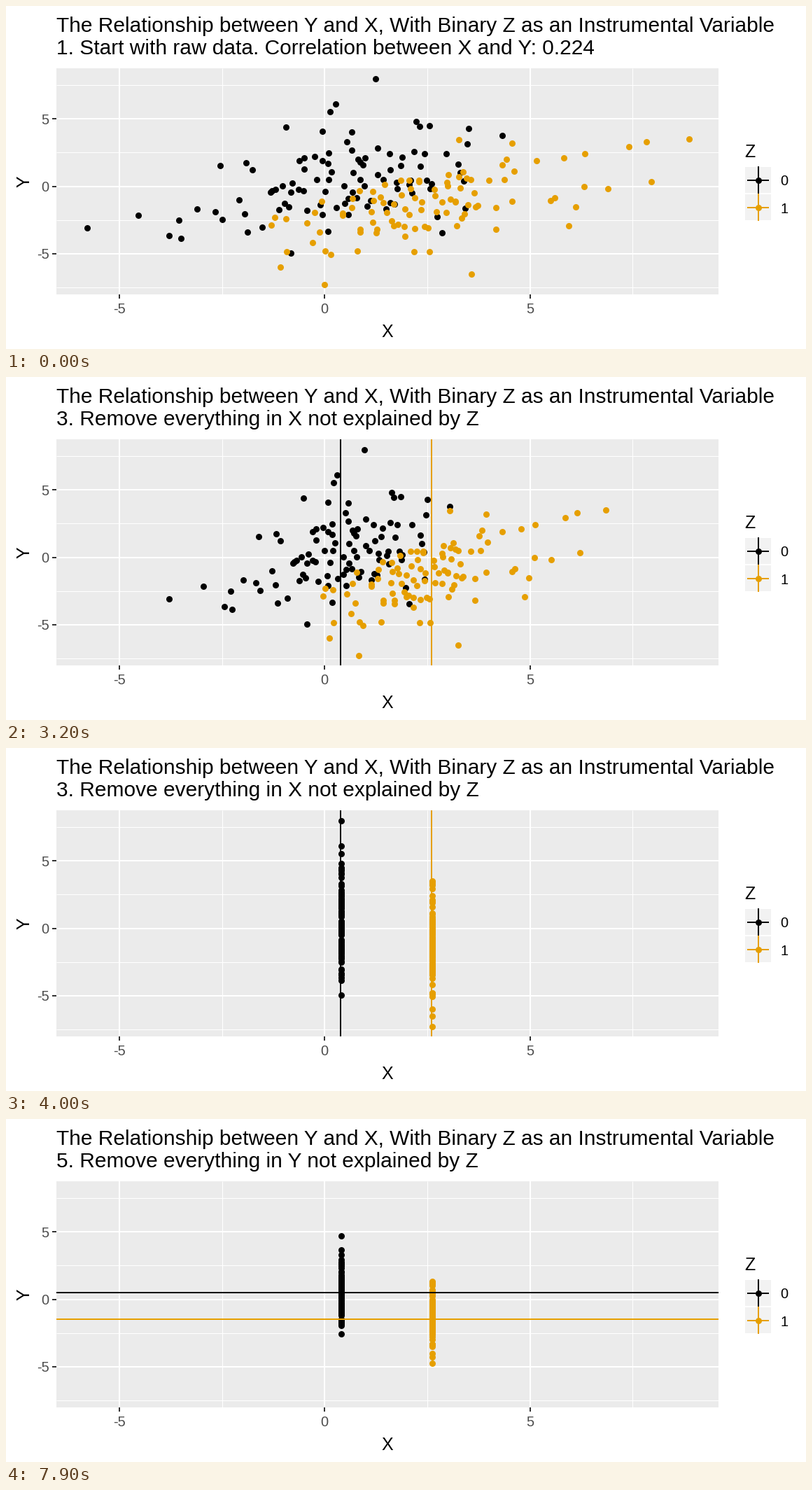
Recreate the animation shown at these times as a matplotlib script. Size 1143 px wide and 490 px high, loop 8000 ms.

```python
import numpy as np
import matplotlib.pyplot as plt
from matplotlib.animation import FuncAnimation
from matplotlib.patches import Rectangle

W, H, DPI = 1143, 490, 64
PT = 72 / DPI                      # points per pixel
STEP, FRAMES = 100, 80             # ms per frame, frames per loop
SLIDE = 1300                       # ms a collapse takes
LEFT, TOP, RIGHT, BOTTOM = 72, 89, 1018, 412
BLACK, ORANGE = "#000000", "#E69F00"
COLORS = (BLACK, ORANGE)
MEANS = ((478, 248), (608, 286))   # group means on the stage

TITLE = "The Relationship between Y and X, With Binary Z as an Instrumental Variable"
STAGES = (
    (0, "1. Start with raw data. Correlation between X and Y: 0.224"),
    (500, "2. Figure out what differences in X are explained by Z"),
    (2800, "3. Remove everything in X not explained by Z"),
    (5100, "4. Figure out what differences in Y are explained by Z"),
    (7400, "5. Remove everything in Y not explained by Z"),
)

# Outlying observations in stage pixels; the cores are generated
OUTER_0 = [
    (115, 316), (188, 298), (232, 327), (249, 331), (246, 305), (272, 289),
    (298, 293), (308, 304), (305, 227), (342, 223), (351, 233), (332, 276),
    (340, 296), (344, 322), (365, 315), (406, 352), (459, 321), (399, 172),
    (451, 178), (470, 139), (462, 150), (527, 103), (493, 179), (585, 164),
    (590, 171), (604, 170), (660, 174), (708, 184), (658, 196), (645, 225),
    (628, 210), (622, 323), (615, 300), (655, 288), (648, 237), (653, 249),
]
OUTER_1 = [
    (975, 189), (914, 193), (889, 200), (826, 210), (796, 216), (757, 220),
    (921, 250), (859, 260), (825, 257), (813, 286), (803, 313), (783, 273),
    (777, 277), (722, 195), (714, 218), (708, 226), (725, 235), (711, 247),
    (722, 278), (699, 318), (699, 287), (646, 190), (664, 382), (604, 350),
    (582, 350), (501, 349), (463, 354), (455, 349), (454, 397), (391, 372),
    (400, 350), (437, 337), (447, 322), (378, 312), (399, 303), (383, 301),
    (429, 309), (440, 294), (450, 278),
]

rng = np.random.default_rng(224)


def core(n, cx, cy, rx, ry, tilt):
    """Evenly filled, jittered ellipse of n points."""
    k = np.arange(n)
    r = np.sqrt((k + 0.5) / n) * rng.uniform(0.9, 1.08, n)
    a = k * np.pi * (3 - np.sqrt(5)) + rng.normal(0, 0.25, n)
    x = rx * r * np.cos(a)
    return np.column_stack([cx + x, cy + ry * r * np.sin(a) - tilt * x])


POINTS = (
    np.vstack([OUTER_0, core(100 - len(OUTER_0), 494, 249, 128, 56, 0.12)]),
    np.vstack([OUTER_1, core(100 - len(OUTER_1), 583, 282, 112, 46, 0.15)]),
)

plt.rcParams["font.family"] = "Liberation Sans"
fig = plt.figure(figsize=(W / DPI, H / DPI), dpi=DPI, facecolor="white")
ax = fig.add_axes([0, 0, 1, 1])
ax.set_xlim(0, W)
ax.set_ylim(H, 0)
ax.axis("off")


def px(v):
    return 455.3 + 58.65 * v


def py(v):
    return 257.5 - 19.28 * v


def line(x0, y0, x1, y1, color, width=2, z=1):
    return ax.plot([x0, x1], [y0, y1], color=color, lw=width * PT, zorder=z,
                   solid_capstyle="butt")[0]


def box(x, y, w, h, color):
    ax.add_patch(Rectangle((x, y), w, h, fc=color, lw=0, zorder=0))


def label(x, y, text, size, color="black", ha="left", **kw):
    return ax.text(x, y, text, fontsize=size * PT, color=color, ha=ha,
                   va="baseline", **kw)


def dots(xy, color, z):
    return ax.scatter(*np.transpose(xy), s=(9 * PT) ** 2, c=color, lw=0,
                      antialiased=False, zorder=z)


# Panel, grid and axes
box(LEFT, TOP, RIGHT - LEFT, BOTTOM - TOP, "#EBEBEB")
for v in (-7.5, -2.5, 2.5, 7.5):
    line(LEFT, py(v), RIGHT, py(v), "white", 1)
    if v > -5:
        line(px(v), TOP, px(v), BOTTOM, "white", 1)
for v in (-5, 0, 5):
    line(LEFT, py(v), RIGHT, py(v), "white")
    line(px(v), TOP, px(v), BOTTOM, "white")
    line(LEFT - 6, py(v), LEFT, py(v), "#333333")
    line(px(v), BOTTOM, px(v), BOTTOM + 6, "#333333")
    label(61.5, py(v) + 7.5, str(v), 19.96, "#4D4D4D", "right")
    label(px(v), 439, str(v), 19.96, "#4D4D4D", "center")
label(545, 473, "X", 24.95, ha="center")
label(33, 250.5, "Y", 24.95, ha="center", rotation=90, rotation_mode="anchor")
label(72.5, 37, TITLE, 29.94)
subtitle = label(72.5, 69, "", 29.94)

# Legend
label(1055, 216, "Z", 24.95)
for i, color in enumerate(COLORS):
    y = 248.5 + 39.2 * i
    box(1056, 230 + 39 * i, 37, 37, "#F2F2F2")
    line(1074.5, y - 19.5, 1074.5, y + 19.5, color, z=3)
    line(1059, y, 1090, y, color, z=3)
    dots([(1074.5, y)], color, 2)
    label(1106, y + 8, str(i), 19.96)

# Moving parts
clouds = [dots(p, c, 2 + i / 10) for i, (p, c) in enumerate(zip(POINTS, COLORS))]
vlines = [line(m[0], TOP, m[0], BOTTOM, c, z=4) for m, c in zip(MEANS, COLORS)]
hlines = [line(LEFT, m[1], RIGHT, m[1], c, z=4) for m, c in zip(MEANS, COLORS)]


def spread(t, start):
    """Share of the deviation left, with sine easing in and out."""
    p = np.clip((t - start) / SLIDE, 0, 1)
    return (1 + np.cos(np.pi * p)) / 2


def update(frame):
    t = frame * STEP
    subtitle.set_text([s for start, s in STAGES if start <= t][-1])
    left = np.array([spread(t, 2700), spread(t, 7300)])
    for cloud, pts, mean in zip(clouds, POINTS, MEANS):
        cloud.set_offsets(np.floor(mean + (pts - mean) * left) + 0.5)
    for v, h in zip(vlines, hlines):
        v.set_visible(900 <= t < 5100)
        h.set_visible(t >= 5500)
    return [subtitle, *clouds, *vlines, *hlines]


anim = FuncAnimation(fig, update, frames=FRAMES, interval=STEP,
                     init_func=lambda: update(0), repeat=True, repeat_delay=0)
plt.show()
```
